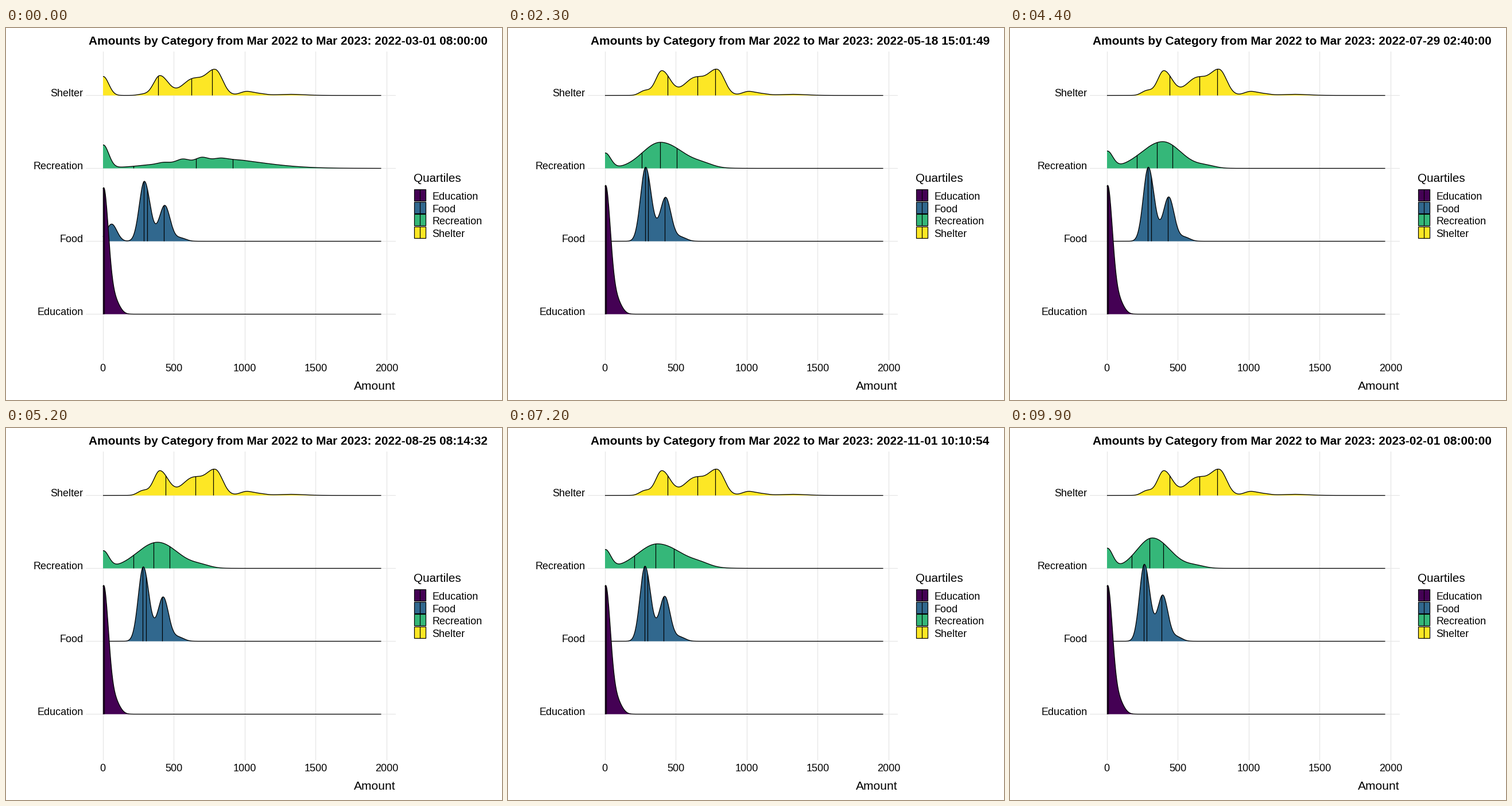
Animation of 864 by 648 pixels, one loop 10 s. Source, as a matplotlib script:

```python
import numpy as np
import matplotlib.pyplot as plt
from matplotlib.animation import FuncAnimation
from matplotlib.collections import PolyCollection
from matplotlib.patches import Rectangle

W, H = 864, 648
FRAMES, STEP = 100, 9            # frames in a loop, frames per month
X0, X1 = 169, 653.5              # ends of every ridge
DAYS = [31, 30, 31, 30, 31, 31, 30, 31, 30, 31, 31, 28]   # Mar .. Feb
START = np.datetime64("2022-03-01T08:00:00")
SPAN = 337 * 86400

NAMES = ["Shelter", "Recreation", "Food", "Education"]
BASE = {name: 117.5 + 127 * i for i, name in enumerate(NAMES)}
COLORS = dict(zip(NAMES, ["#FDE725", "#35B779", "#31688E", "#440154"]))

plt.rcParams["font.family"] = "Liberation Sans"
plt.rcParams["path.snap"] = False
xs = np.linspace(X0, X1, 600)


def hill(centre, height, left, right=None):
    """Bell curve whose two sides may differ in width."""
    width = np.where(xs < centre, left, right or left)
    return height * np.exp(-((xs - centre) / width) ** 2 / 2)


def spike(height):
    return hill(169.5, height, 9.5)


def quartiles(ridge, zero):
    """Quarter points of the area; half of the spike at zero lies off stage."""
    area = np.cumsum(ridge)
    hidden = zero.sum()
    total = area[-1] + hidden
    return np.interp(np.array([0.25, 0.5, 0.75]) * total, area + hidden, xs)


def shelter(month):
    first = month == 0
    zero = spike(33 if first else 0)
    ridge = (zero + hill(238, 2 if first else 8, 9)
             + hill(268, 34.5 if first else 43, 11, 14.5)
             + hill(325, 28 if first else 30, 18) + hill(365, 43, 16, 12.5)
             + hill(418, 6.5, 11) + hill(440, 3, 12) + hill(495, 2, 25))
    return ridge, quartiles(ridge, zero)


# month, peak position, peak height, left width, right width
RECREATION = np.array([(0, 355, 18, 75, 82),
                       (1, 275, 41, 36, 45),
                       (3.7, 259, 49, 28, 36),
                       (4.9, 267, 46.5, 38, 31),
                       (6.7, 261, 44.5, 33, 40),
                       (9.3, 260, 41, 36, 45),
                       (11, 248, 53, 27, 31)]).T


def recreation(month):
    peak, height, left, right = (np.interp(month, RECREATION[0], row)
                                 for row in RECREATION[1:])
    zero = spike(24 + 0.95 * month if month else 40)
    ridge = zero + hill(peak, height, left, right)
    if month:
        ridge = ridge + hill(peak + 76, 4, 16)
    else:
        ridge = ridge + np.cos((xs - 306) * np.pi / 18) * hill(325, 2, 36)
    return ridge, quartiles(ridge, zero)


def food(month):
    k = DAYS[month] / 31             # amounts follow the length of the month
    w = np.sqrt(0.6 + 0.4 * k * k)   # only part of the width scales with it
    share = 0.81 if month == 0 else 1

    def part(offset, height, left, right=None):
        return hill(X0 + offset * k, height * share / w,
                    left * w, (right or left) * w)

    ridge = part(72, 129, 8.8, 10) + part(107.5, 77, 9.5) + part(135, 7, 9.5)
    if month == 0:
        ridge = ridge + hill(184, 30, 9.2)
    return ridge, X0 + k * np.array([71.7, 77, 106])


def education(month):
    ridge = hill(170, 222 if month else 218, 8.5) + hill(189, 23, 9)
    return ridge, np.array([169, 169, 171])


MONTHS = {name: [shape(m) for m in range(12)]
          for name, shape in zip(NAMES, [shelter, recreation, food, education])}


def crisp(v):
    """Centre of the pixel that holds v."""
    return np.floor(v) + 0.5


# --- Stage
fig = plt.figure(figsize=(W / 72, H / 72), dpi=72, facecolor="white")
ax = fig.add_axes([0, 0, 1, 1])
ax.set_xlim(0, W)
ax.set_ylim(H, 0)
ax.axis("off")


def label(x, y, s, size=18, **kw):
    return ax.text(x, y, s, fontsize=size, va="baseline", color="black", **kw)


def stroke(x=(), y=(), color="black", lw=1.2, **kw):
    return ax.plot(x, y, color=color, lw=lw, solid_capstyle="butt", **kw)[0]


for i in range(5):
    gx = 169.3 + 123.55 * i
    stroke([crisp(gx)] * 2, [41, 579], "#E5E5E5", zorder=1)
    label(gx - 0.5, 598.5, str(500 * i), ha="center")
for name, base in BASE.items():
    stroke([139, 679], [base, base], "#E5E5E5", zorder=1)
    label(134.5, base + 1.2, name, ha="right")

title = label(144.5, 29, "", 20.9, weight="bold")
label(679, 630, "Amount", 21, ha="right")
label(710, 268, "Quartiles", 20.6)
for i, name in enumerate(sorted(NAMES)):
    top = crisp(281.5 + 21.6 * i)
    ax.add_patch(Rectangle((711.5, top), 20, 20, fc=COLORS[name],
                           ec="black", lw=1.2))
    stroke([721.5, 721.5], [top, top + 20])
    label(742, top + 17.3, name)

ridges = {}
for z, name in enumerate(NAMES):
    fill = PolyCollection([], facecolor=COLORS[name], edgecolor="none",
                          zorder=10 + 3 * z)
    ax.add_collection(fill, autolim=False)
    marks = [stroke(zorder=11 + 3 * z) for _ in range(3)]
    ridges[name] = fill, marks, stroke(lw=1.3, zorder=12 + 3 * z)


def update(frame):
    stamp = START + np.timedelta64(SPAN * frame // (FRAMES - 1), "s")
    title.set_text("Amounts by Category from Mar 2022 to Mar 2023: "
                   + str(stamp).replace("T", " "))
    month = min(frame // STEP, 10)
    t = frame / STEP - month
    for name, (fill, marks, line) in ridges.items():
        base = BASE[name]
        now, then = MONTHS[name][month:month + 2]
        ridge, cuts = ((1 - t) * a + t * b for a, b in zip(now, then))
        ys = base - ridge
        outline = np.column_stack([xs, ys])
        fill.set_verts([np.vstack([outline, [[X1, base], [X0, base]]])])
        line.set_data(xs, ys)
        for mark, q in zip(marks, crisp(cuts)):
            mark.set_data([q, q], [base, np.interp(q, xs, ys)])
    return []


anim = FuncAnimation(fig, update, frames=FRAMES, interval=100,
                     repeat=True, repeat_delay=0, blit=False)
plt.show()
```
